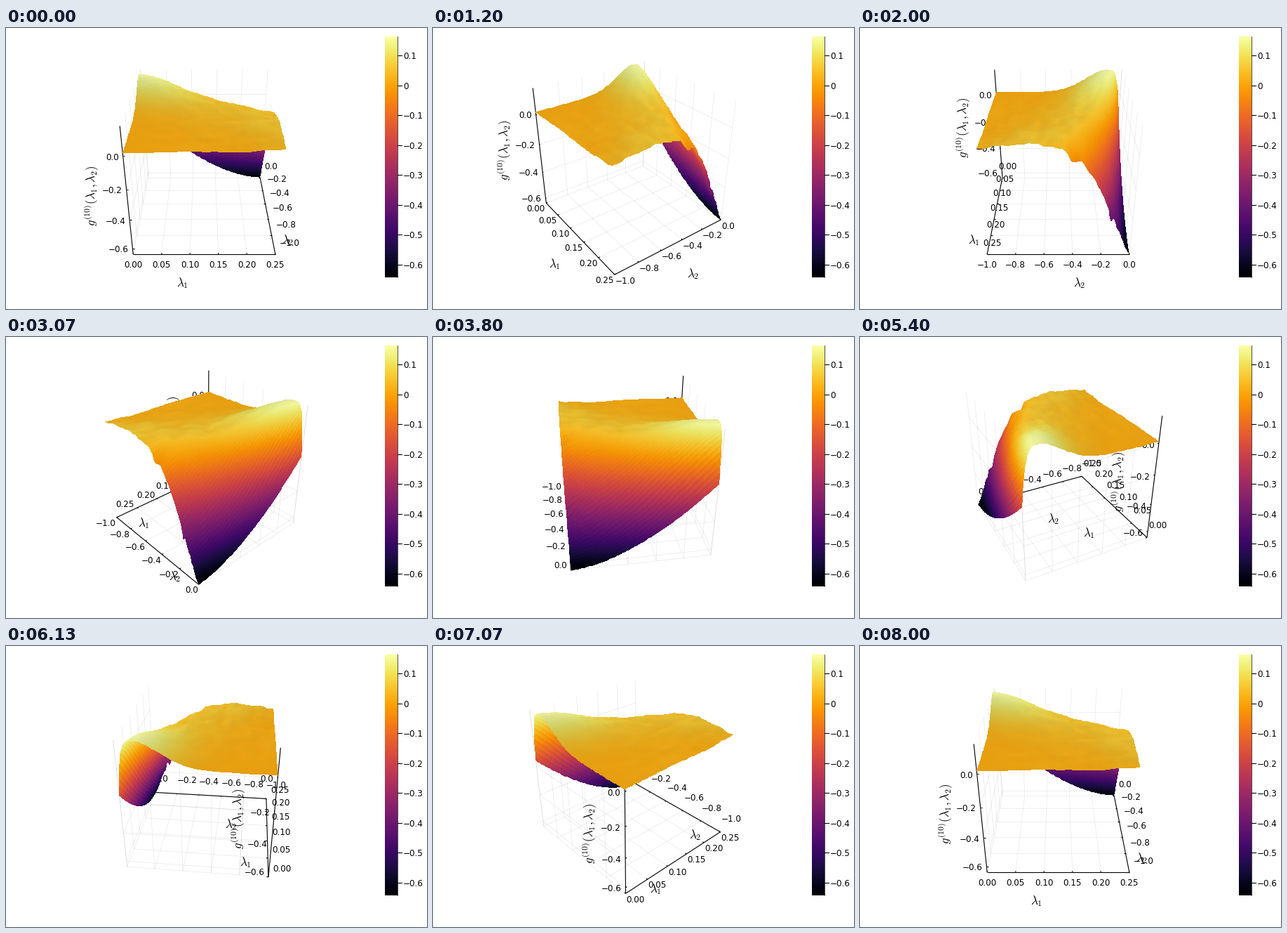
Write a matplotlib script that moves like this. It is 600x400 px and loops after 8070 ms.

```python
import numpy as np
import matplotlib.pyplot as plt
from matplotlib.animation import FuncAnimation
from matplotlib.collections import LineCollection

W, H, DPI = 600, 400, 100
LOOP, CLOCK = 8070, 30   # ms
STEP = 200 / 3           # ms between 3 degree turns
ZMIN, ZMAX = -0.6424, 0.1647
PX = 72 / DPI  # points per pixel

# Camera: box [-1, 1]^3 inside its bounding sphere, 30 degree field of view
CX, CY, ELEV = 282.5, 183.5, np.radians(30)
DIST = np.sqrt(3) / np.sin(np.radians(15))
FOCAL = 171.7 / np.tan(np.radians(15))

plt.rcParams["font.family"] = "DejaVu Sans"
plt.rcParams["mathtext.fontset"] = "cm"
cmap = plt.get_cmap("inferno")


def project(p, az):
    x, y, z = np.moveaxis(np.asarray(p, float), -1, 0)
    right = x * np.cos(az) + y * np.sin(az)
    near = x * np.sin(az) - y * np.cos(az)
    up = z * np.cos(ELEV) - near * np.sin(ELEV)
    scale = FOCAL / (DIST - near * np.cos(ELEV) - z * np.sin(ELEV))
    return np.stack([CX + right * scale, CY - up * scale], -1)


def unit(v, lo, hi):
    return 2 * (np.asarray(v) - lo) / (hi - lo) - 1


# ---------- surface ----------
N = 72


def smooth_noise(rng, su, st):
    def kernel(s):
        k = np.exp(-0.5 * (np.arange(-16, 17) / s) ** 2)
        return k / k.sum()
    a = rng.normal(size=(N + 33, N + 33))
    a = np.apply_along_axis(np.convolve, 0, a, kernel(su), "valid")
    a = np.apply_along_axis(np.convolve, 1, a, kernel(st), "valid")
    return a / a.std()


def height(u, t):
    v = np.clip(u / 0.6, 0, 1)
    peak = -(0.12 + 0.3 * u + 0.3 * u**2)
    top = 0.06 + 0.006 * u + 0.1047 * (1 - v * v * (3 - 2 * v))
    edge = -0.157 - 0.485 * (1 - (1 - u) ** 1.7)
    base = 0.014 + 0.018 * u
    q = np.clip(peak - t, 0, None)
    p = np.clip((t - peak) / -peak, 0, 1)
    rise = base + (top - base) * np.exp(-(q / 0.235) ** 1.8)
    drop = 1 - (1 - p ** (4 - 0.9 * u)) ** (1 + 0.3 * u)
    return np.where(t < peak, rise, top - (top - edge) * drop)


def bump(u, t, t0, wt, wu):
    return np.exp(-((t - t0) / wt) ** 2 - ((u - 1) / wu) ** 2)


rng = np.random.default_rng(7)
us = np.linspace(0, 1, N + 1)
ts = -np.linspace(1, 0, N + 1) ** 1.4  # finer towards the steep edge
u, t = np.meshgrid(us, ts, indexing="ij")
z = height(u, t)
fade = np.clip(-t / 0.06, 0, 1)
z += fade * (0.0007 + 0.004 * u) * smooth_noise(rng, 3.2, 1.4)
z += fade * 0.006 * u * np.clip(1 + t, 0.3, 1) * smooth_noise(rng, 1.5, 1.1)
z += (-0.03 * bump(u, t, -0.415, 0.03, 0.12) + 0.015 * bump(u, t, -0.345, 0.025, 0.12)
      - 0.06 * bump(u, t, -0.146, 0.013, 0.06))
z = np.clip(z, ZMIN, ZMAX)
surf = np.stack([2 * u - 1, 2 * t + 1, unit(z, ZMIN, ZMAX)], -1)


def mid(a):
    return (a[1:, 1:] + a[:-1, 1:] + a[1:, :-1] + a[:-1, :-1]) / 4


gx, gy = np.gradient(surf[..., 2], 2 * us, 2 * ts)
tilt = -(gx + gy) / np.sqrt(1 + gx**2 + gy**2)
light = np.clip(0.92 + 0.08 * mid(tilt), 0.82, 0.97)
faces = cmap((mid(z) - ZMIN) / (ZMAX - ZMIN))[..., :3] * light[..., None]

# ---------- axes box ----------
xt = np.linspace(0, 0.25, 6)
yt = np.linspace(-1, 0, 6)
zt = np.array([-0.6, -0.4, -0.2, 0.0])
ux, uy, uz = unit(xt, 0, 0.25), unit(yt, -1, 0), unit(zt, ZMIN, ZMAX)

x_pos = np.array([(v, -1, -1) for v in ux])
y_pos = np.array([(1, v, -1) for v in uy])
z_pos = np.array([(-1, -1, v) for v in uz])

grid = np.array(
    [s for v in ux for s in (((v, -1, -1), (v, 1, -1)), ((v, 1, -1), (v, 1, 1)))]
    + [s for v in uy for s in (((1, v, -1), (-1, v, -1)), ((-1, v, -1), (-1, v, 1)))]
    + [s for v in uz for s in (((-1, -1, v), (-1, 1, v)), ((-1, 1, v), (1, 1, v)))])

TICK = 0.024
spines = np.array(
    [((-1, -1, -1), (1, -1, -1)), ((1, -1, -1), (1, 1, -1)), ((-1, -1, -1), (-1, -1, 1))]
    + [(p, p + (0, TICK, 0)) for p in x_pos]
    + [(p, p - (TICK, 0, 0)) for p in y_pos]
    + [(p, p + (TICK, 0, 0)) for p in z_pos])

fig = plt.figure(figsize=(W / DPI, H / DPI), dpi=DPI, facecolor="white")
ax = fig.add_axes([0, 0, 1, 1])
ax.axis("off")

grid_lines = ax.add_collection(
    LineCollection([], colors=(0, 0, 0, 0.1), linewidths=0.45, zorder=1), autolim=False)
spine_lines = ax.add_collection(
    LineCollection([], colors="black", linewidths=0.8, zorder=2), autolim=False)


def number(v, digits):
    return f"{v:.{digits}f}".replace("-", "\u2212")


def label(s, px, ha="center", **kw):
    return ax.text(0, 0, s, fontsize=px * PX, ha=ha, zorder=3, **kw)


def tick_labels(values, digits, ha):
    return [label(number(v, digits), 12, ha, va="center_baseline") for v in values]


x_labels = tick_labels(xt, 2, "center")
y_labels = tick_labels(yt, 1, "center")
z_labels = tick_labels(zt, 1, "right")
x_name = label(r"$\lambda_1$", 17, va="center")
y_name = label(r"$\lambda_2$", 17, va="center")
z_name = label(r"$g^{(10)}(\lambda_1, \lambda_2)$", 17, va="center", rotation=90)

# ---------- colour bar ----------
ax.imshow(np.linspace(1, 0, 256)[:, None], cmap=cmap, vmin=0, vmax=1,
          extent=(540, 558, 355, 12), aspect="auto", interpolation="nearest")
ax.plot([558, 558], [12, 355], color="black", lw=0.5)
for k in range(1, -7, -1):
    v = k / 10
    ty = 355 - 343 * (v - ZMIN) / (ZMAX - ZMIN)
    ax.plot([558, 564], [ty, ty], color="black", lw=0.8)
    ax.text(566, ty, number(v, 1) if k else "0", fontsize=12 * PX,
            ha="left", va="center_baseline")

ax.set_xlim(0, W)
ax.set_ylim(H, 0)
ax.set_autoscale_on(False)


def place_ticks(labels, pos, az, facing):
    """Offset and align tick labels by the slope of their axis on screen."""
    pts = project(pos, az)
    dx, dy = pts[-1] - pts[0]
    slope = abs(np.degrees(np.arctan2(dy, dx)))
    side = -1 if 0 < (facing + 180) % 360 - 180 < 180 else 1
    ox = side * np.interp(slope, [0, 28, 46, 70, 91, 101, 137, 155, 180],
                          [0, 0.5, 1.3, 3.5, 6.4, 6, 2, 1.2, 0])
    oy = np.interp(slope, [0, 10, 28, 46, 80, 91, 101, 137, 180],
                   [14, 11, 7.5, 7, 0, -13, -16.5, -19, -20])
    if slope < 8:
        ha = "center"
    else:
        ha = "right" if side < 0 and slope < 90 else "left"
    for text, (px, py) in zip(labels, pts):
        text.set_position((px + ox, py + oy))
        text.set_ha(ha)


mesh = None
shown = None


def draw_surface(az):
    """Redraw the mesh with its cells ordered from far to near."""
    global mesh
    if mesh is not None:
        mesh.remove()
    xy, col = project(surf, az), faces
    tx, ty = np.sin(az), -np.cos(az)
    if tx < 0:
        xy, col = xy[::-1], col[::-1]
    if ty < 0:
        xy, col = xy[:, ::-1], col[:, ::-1]
    if abs(ty) > abs(tx):
        xy, col = xy.swapaxes(0, 1), col.swapaxes(0, 1)
    mesh = ax.pcolormesh(xy[..., 0], xy[..., 1], col, shading="flat", zorder=5)


def pose(deg):
    az = np.radians(deg)
    grid_lines.set_segments(project(grid, az))
    spine_lines.set_segments(project(spines, az))
    place_ticks(x_labels, x_pos, az, deg)
    place_ticks(y_labels, y_pos, az, deg - 90)
    for text, (px, py) in zip(z_labels, project(z_pos, az)):
        text.set_position((px - 6, py + 0.5))
    for name, centre, shift in ((x_name, (0, -1, -1), (-31, 41.5)),
                                (y_name, (1, 0, -1), (30, 41.5)),
                                (z_name, (-1, -1, 0), (-51, 0.5))):
        name.set_position(project(centre, az) + shift)
    draw_surface(az)


def update(i):
    """Turn to the step reached by the end of this clock tick."""
    global shown
    deg = 3 * int((i * CLOCK + 23.4) / STEP) % 360
    if deg != shown:
        pose(deg)
        shown = deg
    return []


anim = FuncAnimation(fig, update, frames=LOOP // CLOCK, interval=CLOCK,
                     repeat=True, repeat_delay=0, blit=False)
plt.show()
```
